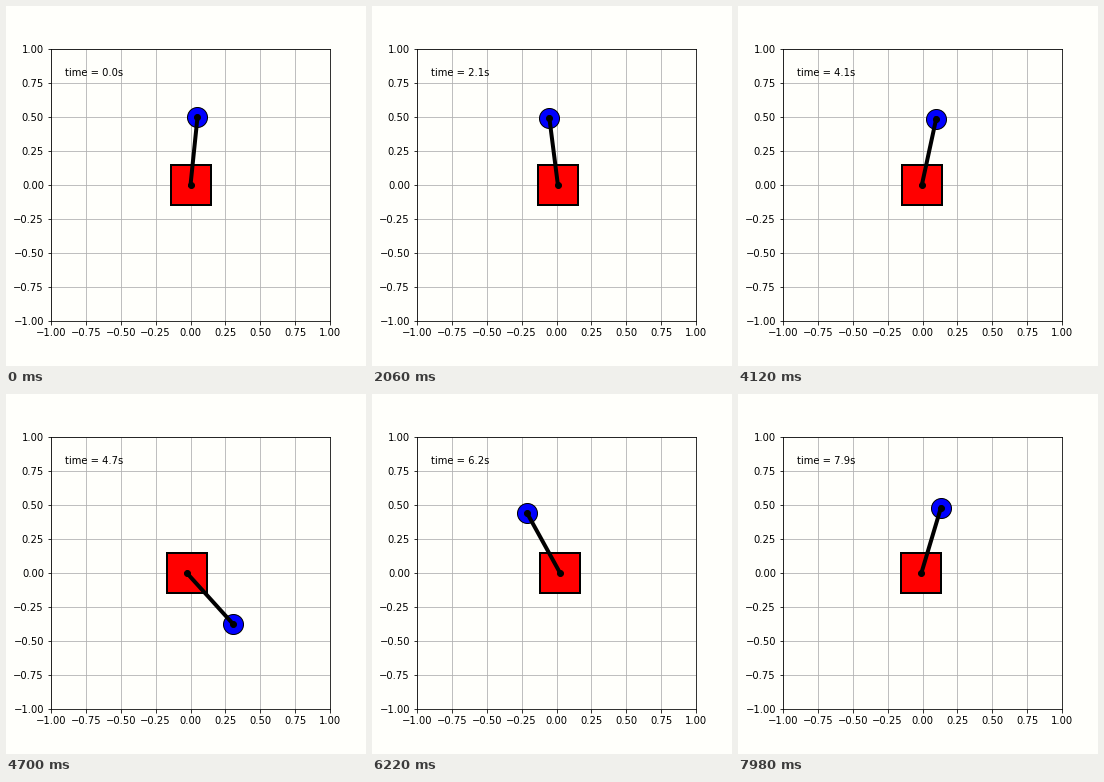
These frames come from a looping animation (360x360 px, 8000 ms). A matplotlib script:

```python
import numpy as np
import matplotlib.pyplot as plt
from matplotlib.animation import FuncAnimation

G, L = 9.8, 0.5
CART, BOB = 1.0, 0.1
DRAG = 1.2e-4
START = 0.1              # angle from upright, clockwise
DT = 10 / 239            # simulated seconds per pose
POSE_MS, TICK, LOOP = 42, 20, 8000
SUBSTEPS = 20


def slope(state):
    th, om = state
    s, c = np.sin(th), np.cos(th)
    acc = ((CART + BOB) * G * s - BOB * L * om**2 * s * c) / (L * (CART + BOB * s**2))
    return np.array([om, acc - DRAG * om])


def rk4(state, h):
    k1 = slope(state)
    k2 = slope(state + h / 2 * k1)
    k3 = slope(state + h / 2 * k2)
    k4 = slope(state + h * k3)
    return state + h / 6 * (k1 + 2 * k2 + 2 * k3 + k4)


def simulate(count):
    state = np.array([START, 0.0])
    angles = [START]
    for _ in range(count - 1):
        for _ in range(SUBSTEPS):
            state = rk4(state, DT / SUBSTEPS)
        angles.append(state[0])
    return np.array(angles)


theta = simulate(LOOP // POSE_MS + 1)
# the centre of mass stays put, so the cart recoils against the bob
cart_x = -BOB / (CART + BOB) * L * (np.sin(theta) - np.sin(START))
bob_x = cart_x + L * np.sin(theta)
bob_y = L * np.cos(theta)

BG = "#fffffb"
plt.rcParams.update({"font.family": "DejaVu Sans", "font.size": 10})
fig = plt.figure(figsize=(5, 5), dpi=72, facecolor=BG)
fig.subplots_adjust(left=0.125, right=0.9, bottom=0.125, top=0.88)
ax = fig.add_subplot(facecolor=BG, xlim=(-1, 1), ylim=(-1, 1))
ticks = np.linspace(-1, 1, 9)
ax.set_xticks(ticks)
ax.set_yticks(ticks)
ax.grid(color="#b0b0b0", lw=0.8)

cart, = ax.plot([], [], "s", ms=40, mfc="red", mec="black", mew=2)
bob, = ax.plot([], [], "o", ms=20, mfc="blue", mec="black", mew=1)
rod, = ax.plot([], [], "o-", color="black", lw=4, ms=6)
clock = ax.text(0.05, 0.9, "", transform=ax.transAxes)


def draw(k):
    i = (k * TICK + TICK // 2) // POSE_MS
    cart.set_data([cart_x[i]], [0])
    bob.set_data([bob_x[i]], [bob_y[i]])
    rod.set_data([cart_x[i], bob_x[i]], [0, bob_y[i]])
    clock.set_text(f"time = {i * DT:.1f}s")
    return cart, bob, rod, clock


anim = FuncAnimation(fig, draw, frames=LOOP // TICK, interval=TICK,
                     init_func=lambda: draw(0), repeat=True, repeat_delay=0)
plt.show()
```
